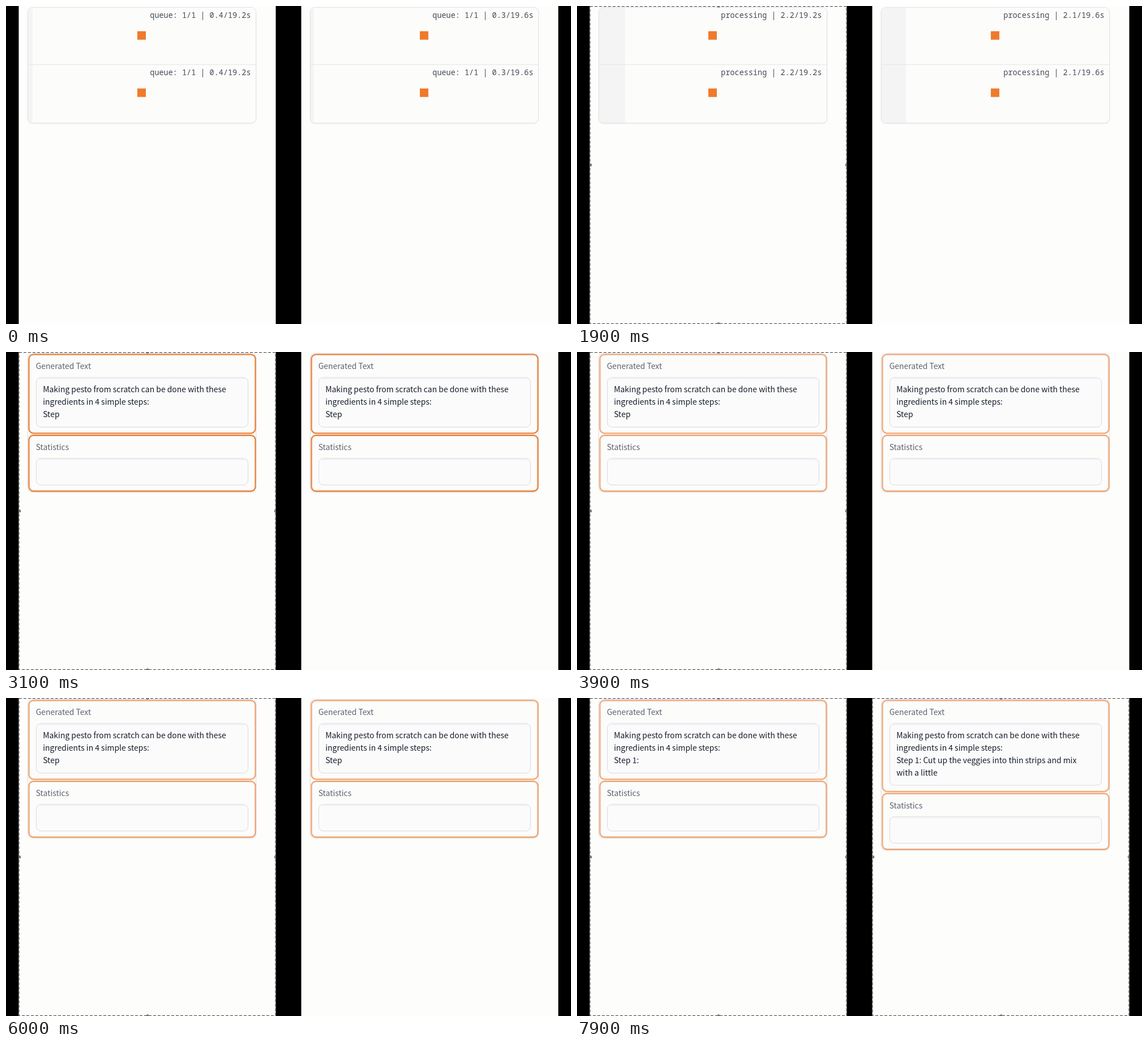
These frames come from a looping animation (998x561 px, 8000 ms). An HTML page:

```html
<!DOCTYPE html>
<html lang="en">
<head>
<meta charset="utf-8">
<title>Two streaming panels</title>
<style>
  html, body { margin: 0; width: 100%; height: 100%; overflow: hidden; background: #000; }
  svg { display: block; width: 998px; height: 561px; }
  text { white-space: pre; }
  .status { font: 13.5px "Noto Sans Mono", "Liberation Mono", monospace; fill: #454b58; text-anchor: end; }
  .label, .body { font: 13.94px "Noto Sans CJK SC", "Noto Sans CJK JP", "Noto Sans CJK", sans-serif; }
  .label { fill: #5c6371; }
  .body { fill: #151d2b; }
  .card { fill: #fcfcfb; stroke: #e1e1ec; filter: drop-shadow(0 1px 1px rgba(0, 0, 0, .06)); }
  .field { fill: #fbfbfb; stroke: #d9d9e6; }
  .glow { fill: none; stroke: #e56c1a; stroke-width: 1.8; filter: drop-shadow(0 0 1px rgba(235, 120, 40, .5)); }
  .frame { fill: none; stroke: #5c5c5c; stroke-width: 1.4; stroke-dasharray: 5 3; }
  .handle { fill: #757575; }
</style>
</head>
<body>
<svg id="stage" viewBox="0 0 998 561"></svg>
<script>
const LOOP = 8000, STEP = 100, READY = 2800, LINE = 22;
const stage = document.getElementById('stage');
const INTRO = ['Making pesto from scratch can be done with these', 'ingredients in 4 simple steps:'];

// start: elapsed seconds at time 0; words arrive from `first`, one every `gap` ms
const sides = [
  { x: 0, start: 0.37, eta: 19.2, selected: 1900, words: ['1:'], first: 7600, gap: 125 },
  { x: 499, start: 0.27, eta: 19.6, selected: 6100, first: 6350, gap: 125,
    words: '1: Cut up the veggies into thin strips and mix\nwith a little'.split(/ |(?=\n)/) }
];

const rect = (cls, x, y, w, h, r = 8, more = '') =>
  `<rect class="${cls}" x="${x}" y="${y}" width="${w}" height="${h}" rx="${r}" ${more}/>`;
const text = (cls, x, y, s) => `<text class="${cls}" x="${x}" y="${y}">${s}</text>`;

// Smooth pulse of the orange outline, two seconds per cycle
const pulse = t => 0.81 + 0.19 * Math.cos((t - READY) / 1000 * Math.PI);

function waiting(side, t) {
  const elapsed = side.start + t / 1000 * 0.96;
  const state = t < 600 ? 'queue: 1/1' : 'processing';
  const status = `${state} | ${elapsed.toFixed(1)}/${side.eta}s`;
  const row = y => text('status', 432.5, y + 21, status) +
    rect('', 232, y + 44.5, 15, 15, 0, 'fill="#ef7a2c"');
  return rect('card', 38.5, 2.5, 403, 204) +
    `<g clip-path="url(#inside)">${rect('', 39, 3, 403 * elapsed / side.eta, 203, 0, 'fill="#f4f4f4"')}</g>` +
    '<path d="M39 103.5H441" stroke="#e6e6ec"/>' + row(0) + row(101);
}

function block(label, y, h, alpha) {
  return text('label', 52.7, y + 26.3, label) +
    rect('field', 53.5, y + 41, 374, h - 51.5) +
    `<path d="M57 ${y + 42.5}H424" stroke="#f0f0f3" stroke-width="2"/>` +
    rect('glow', 40.5, y + .3, 400, h, 8, `opacity="${alpha}"`);
}

function output(side, t) {
  const count = Math.max(0, Math.floor((t - side.first) / side.gap) + 1);
  const typed = ['Step', ...side.words.slice(0, count)].join(' ').split(' \n');
  const lines = [...INTRO, ...typed];
  const grow = (lines.length - 3) * (LINE - .5);
  const alpha = pulse(t).toFixed(3);
  return rect('card', 38.5, 2.5, 403, 244 + grow) +
    block('Generated Text', 4, 139 + grow, alpha) +
    block('Statistics', 146.7 + grow, 98.5, alpha) +
    lines.map((s, i) => text('body', 65.2, 71 + i * LINE, s)).join('');
}

function selection() {
  const dots = [[250, 0], [250, 561], [23.5, 280.5], [476.5, 280.5]];
  return '<g clip-path="url(#panel)">' + rect('frame', 23, .5, 453, 560, 0) +
    dots.map(([x, y]) => `<circle class="handle" cx="${x}" cy="${y}" r="2.8"/>`).join('') + '</g>';
}

function draw(t) {
  stage.innerHTML = `<clipPath id="inside">${rect('', 39, 3, 402, 203)}</clipPath>` +
    `<clipPath id="panel">${rect('', 22.5, 0, 454, 561, 0)}</clipPath>` +
    sides.map(side => `<g transform="translate(${side.x})">` +
      rect('', 22.5, 0, 454, 561, 0, 'fill="#fdfdfb"') +
      (t < READY ? waiting : output)(side, t) +
      (t >= side.selected ? selection() : '') + '</g>').join('');
}

let last = -1;
function tick() {
  const t = Math.floor(performance.now() % LOOP / STEP) * STEP;
  if (t !== last) draw(last = t);
  requestAnimationFrame(tick);
}
tick();
</script>
</body>
</html>
```
